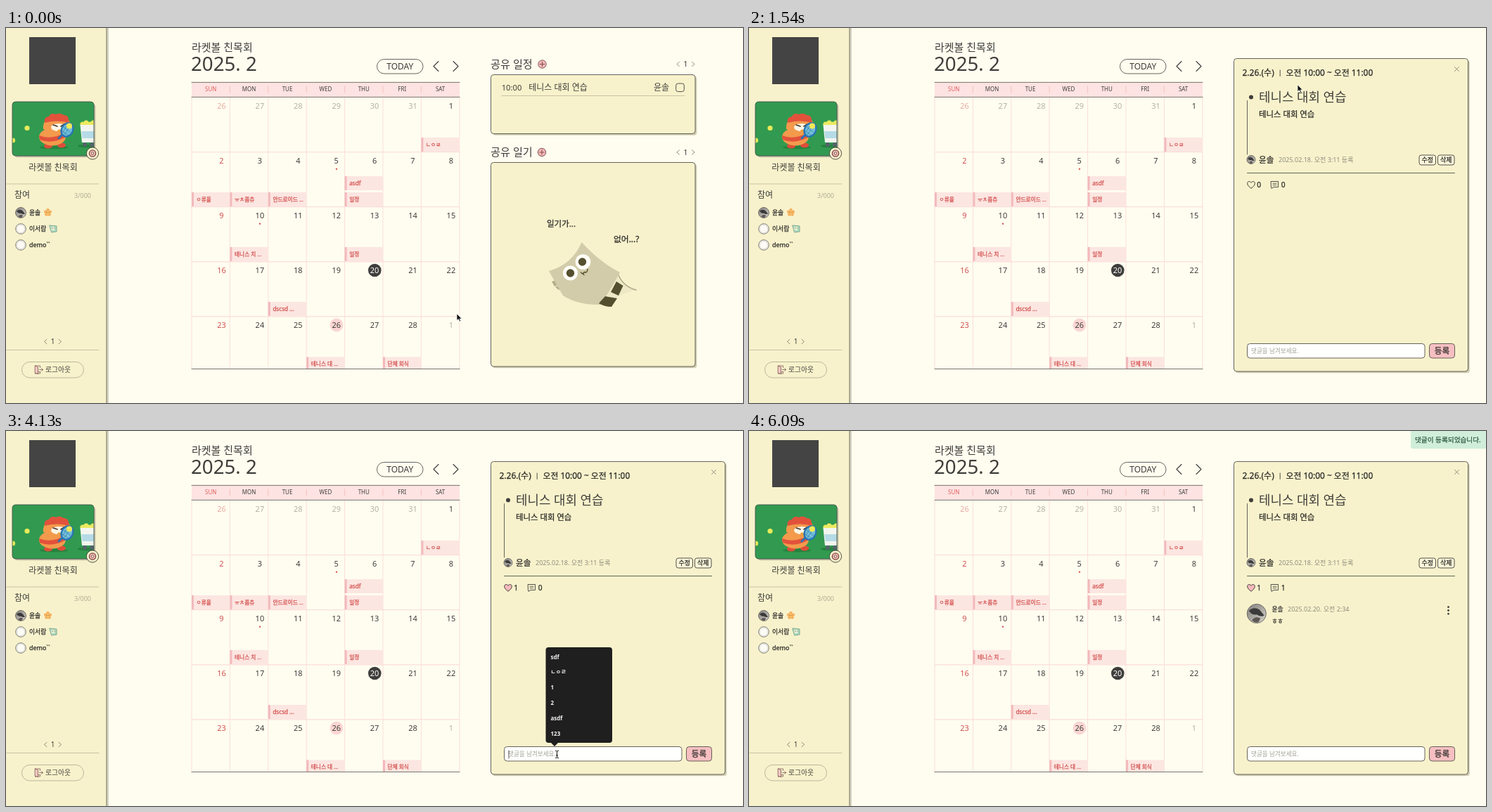
An HTML page that plays this animation: 1048 by 534 pixels, repeating every 7.28 s.

```html
<!DOCTYPE html>
<html lang="ko">
<head>
<meta charset="utf-8">
<style>
html, body { margin: 0; width: 100%; height: 100%; overflow: hidden; background: #fffdf0; }
svg { display: block; font-family: "Noto Sans", "Noto Sans CJK KR", sans-serif; }
</style>
</head>
<body>
<svg id="stage" width="1048" height="534" viewBox="0 0 1048 534"></svg>
<script>
const LOOP = 7280, STEP = 70;
const INK = '#3f3e3a', DARK = '#2b2a27', LINE = '#55534b', CREAM = '#f8f2cc', PAPER = '#fffdf0';
const RED = '#d3504f', GREY = '#8f8c7c', EDGE = '#c2bda1';
const CLUB = '라켓볼 친목회', USER = '윤솔', EVENT = '테니스 대회 연습';

// ---- drawing helpers ----
// o.m thickens the glyphs slightly, for a medium weight
const text = (x, cy, size, str, o = {}) => {
  const fill = o.fill || (o.m ? DARK : INK);
  const medium = o.m ? ` stroke="${fill}" stroke-width=".25"` : '';
  return `<text x="${x}" y="${(cy + size * 0.36).toFixed(2)}" font-size="${size}" fill="${fill}" font-weight="${o.w || 400}" text-anchor="${o.a || 'start'}"${medium}${o.id ? ` id="${o.id}"` : ''}>${str}</text>`;
};
const rect = (x, y, w, h, fill, r = 0, stroke = 'none', sw = 0.9) =>
  `<rect x="${x}" y="${y}" width="${w}" height="${h}" rx="${r}" fill="${fill}" stroke="${stroke}" stroke-width="${sw}"/>`;
const circle = (x, y, r, fill, stroke = 'none', sw = 0.9) =>
  `<circle cx="${x}" cy="${y}" r="${r}" fill="${fill}" stroke="${stroke}" stroke-width="${sw}"/>`;
const ellipse = (x, y, rx, ry, fill, rot = 0) =>
  `<ellipse cx="${x}" cy="${y}" rx="${rx}" ry="${ry}" fill="${fill}" transform="rotate(${rot} ${x} ${y})"/>`;
const path = (d, stroke = INK, sw = 0.9, fill = 'none') =>
  `<path d="${d}" fill="${fill}" stroke="${stroke}" stroke-width="${sw}" stroke-linejoin="round" stroke-linecap="round"/>`;
const shape = (d, fill) => path(d, 'none', 0, fill);
const group = (id, body) => `<g id="${id}">${body}</g>`;
const chevron = (x, y, w, h, dir, color = INK, sw = 1) =>
  path(`M${x - dir * w / 2} ${y - h / 2}L${x + dir * w / 2} ${y}L${x - dir * w / 2} ${y + h / 2}`, color, sw);
const card = (x, y, w, h) =>
  rect(x + 2.3, y + 2.3, w, h, '#cfcbb2', 4) + rect(x, y, w, h, CREAM, 4, LINE);
const plus = (x, y) =>
  circle(x, y, 5.7, '#f6b9b8', '#6b4a46', 0.9) + path(`M${x - 3.2} ${y}h6.4M${x} ${y - 3.2}v6.4`, '#7a3d3c', 0.9);
const photo = (x, y, r) =>
  circle(x, y, r, 'url(#photo)') +
  `<g transform="translate(${x} ${y}) scale(${r / 10})">` +
  shape('M-8 -3Q-3 -8 3 -4L8 2Q4 4 0 1Q-5 2 -8 -3Z', '#3b3a3b') +
  shape('M-5 7Q-1 2 4 5L2 9Q-2 10 -5 7Z', '#5d5754') + '</g>' +
  circle(x, y, r, 'none', '#5a5854', 0.8);
const pager = (x, y, gap, size) =>
  chevron(x - gap, y, 3.6, 6.4, -1, '#77735f', 0.8) + text(x, y, size, '1', { a: 'middle' }) +
  chevron(x + gap, y, 3.6, 6.4, 1, '#77735f', 0.8);

function clubArt() {
  return rect(11.3, 107.3, 116, 77, '#c3bfa5', 5) +
    `<clipPath id="clip">${rect(9, 105, 116, 77, '#fff', 4)}</clipPath><g clip-path="url(#clip)">` +
    rect(9, 105, 116, 77, '#319a50') +
    ellipse(68, 170, 20, 2.6, '#26823f') + ellipse(115, 168, 13, 2.4, '#26823f') +
    circle(30, 142.5, 3.6, '#e8ea5a') + circle(9.5, 160, 3.6, '#e8ea5a') +
    ellipse(60, 168, 6, 3.6, '#dd4e39') + ellipse(79, 167, 6, 3.4, '#dd4e39') +
    ellipse(66, 155, 19, 12.5, '#f39a4c') +
    shape('M47 153Q64 160 84 149L85 155Q66 166 48 159Z', '#e2523b') +
    shape('M53 144Q52 132 60 129H87Q93 134 91 144Q73 152 53 144Z', '#f39a4c') +
    shape('M55 135Q53 127 61 126Q64 120 71 123Q77 120 82 124Q89 124 89 131L90 135Q72 130 55 135Z', '#e2523b') +
    ellipse(75, 141.5, 11, 5.5, '#fdf4e4') +
    path('M67 138l6 2M83 137l-5 3', '#3b3130', 1.5) + ellipse(76, 146, 3, 1.6, '#f0a23c') +
    path('M75 157L81 151', '#2874b4', 3) +
    `<g transform="rotate(28 87 145)"><ellipse cx="87" cy="145" rx="8" ry="10" fill="#74bfd9" stroke="#2874b4" stroke-width="2.4"/></g>` +
    path('M82 141l10 8M80 147l9 6M92 139l-9 13M88 137l-7 11', '#317da9', 0.7) +
    circle(90, 139.5, 4, '#f0e957') +
    [109, 114, 119, 124].map((x, i) => circle(x, 137 - i % 2 * 2, 3.6, '#ecea60')).join('') +
    shape('M105.500 138H126V163H108Z', '#f3f5ee') + shape('M107.500 147H126V157H108.500Z', '#b5dbe6') +
    circle(112, 166, 3, '#55636a') + circle(122, 166, 3, '#55636a') +
    '</g>' + rect(9, 105, 116, 77, 'none', 5, '#45534a');
}

function sidebar() {
  const ring = y => circle(21, y, 7.3, '#fcfbf5', '#6e6c66', 0.9) + circle(21, y, 5.6, 'none', '#d4d2c9', 0.8);
  return rect(143, 0, 3, 534, '#d6d3c0') + rect(0, 0, 143, 534, CREAM) + rect(142.5, 0, 0.9, 534, '#66645a') +
    rect(33, 13, 66, 67, '#444444') + clubArt() +
    circle(123, 178.5, 8.6, CREAM, INK) + circle(123, 178.5, 4.6, '#f3bcb8', '#774644', 1.3) + circle(123, 178.5, 1.8, CREAM, '#774644', 0.9) +
    text(67, 199, 12, CLUB, { a: 'middle' }) +
    path('M1 222H132', EDGE) + text(12, 238, 12, '참여') + text(121, 238.5, 9, '3/000', { a: 'end', fill: '#b0ac96' }) +
    photo(21, 263, 7.5) + ring(286) + ring(309) +
    text(33, 263, 8.8, USER, { m: 1 }) + text(33, 286, 8.8, '이서람', { m: 1 }) + text(33, 309, 9, 'demo``', { m: 1 }) +
    [0, 1, 2, 3, 4].map(i => circle(59.5 + 3.4 * Math.sin(i * 1.257), 262.8 - 3.4 * Math.cos(i * 1.257), 2.3, '#f5b05c')).join('') +
    circle(59.5, 262.8, 3, '#f8bd68') + path('M58 262.5h.1M61 262.5h.1', '#80502a', 1) +
    path('M62 281L72 282L72 290L65 291Z', '#6f9b86', 0.8, '#a9d9be') + rect(64.5, 283, 5, 5, '#e6efd0', 1) + path('M66 285h.1M69 285h.1', INK, 1) +
    pager(66.5, 446.5, 10.3, 10) + path('M1 458.5H132', EDGE) +
    rect(22.5, 475.5, 88, 22.5, 'none', 11.2, '#b3af97', 0.9) +
    path('M41.500 481h7v2.500M48.500 489.500v2.500h-7z', '#7d5a55', 0.8) + path('M41.500 481l4 1.800v10l-4 -1.500z', '#7d5a55', 0.8, '#f6c6c3') +
    path('M47.500 486.500h5M50.700 484.700l1.900 1.800l-1.900 1.800', '#7d5a55', 0.8) +
    text(56, 486.8, 9.8, '로그아웃');
}

function calendar() {
  const X = 264, Y = 98.5, CW = 54.4, RH = 78.1, R = 645, B = 485.5;
  const days = ['SUN', 'MON', 'TUE', 'WED', 'THU', 'FRI', 'SAT'];
  const events = [
    [6, 156, 'ㄴㅇㄹ'], [0, 234, 'ㅇ류율'], [1, 234, 'ㅠㅊ퓸츄'], [2, 234, '안드로이드 ...'],
    [4, 211, 'asdf', 8.2], [4, 234, '일정'], [1, 312, '테니스 치 ...'], [4, 312, '일정'],
    [2, 390, 'dscsd ...', 8.1], [3, 468.5, '테니스 대 ...'], [5, 468.5, '단체 회식']];
  let s = text(X, 28, 15, CLUB, { w: 300 }) + text(X - 1, 51, 27.7, '2025. 2', { w: 300 }) +
    rect(527.5, 44.5, 65.5, 20.5, 'none', 10.2, LINE) + text(560.3, 54.6, 12, 'TODAY', { a: 'middle' }) +
    chevron(611.5, 54.5, 7, 14, -1, INK, 1.1) + chevron(639.5, 54.5, 7, 14, 1, INK, 1.1) +
    rect(X, 77, R - X, 21, '#fde3e2');
  for (let i = 0; i <= 7; i++) {
    const x = X + i * CW;
    s += path(`M${x} 99V485`, '#fbdedb', 1);
    if (i && i < 7) s += path(`M${x} 83V92`, '#f3c0bd', 0.9);
    if (i < 7) s += text(x + CW / 2, 87.2, 8, days[i], { a: 'middle', fill: i ? INK : '#e2605d' });
  }
  for (let r = 1; r < 5; r++) s += path(`M${X} ${Y + r * RH}H${R}`, '#fbdedb', 1.2);
  for (const [c, y, label, size = 7.7] of events) {
    const x = X + c * CW, h = Math.min(20, B - y);
    s += rect(x, y, CW, h, '#fce6e1') + rect(x, y, 3, h, '#f2babb') + text(x + 6.6, y + 9.8, size, label, { fill: RED, m: 1 });
  }
  s += path(`M${X} 77.4H${R}M${X} 98.4H${R}M${X} ${B}H${R}`, '#6a675e', 0.9);
  s += circle(524.3, 345, 9.3, '#3f3e3c') + circle(470, 423, 9.4, '#fbd6d3');
  for (let k = 0; k < 35; k++) {
    const c = k % 7, r = Math.floor(k / 7), n = k - 5;
    const day = n < 1 ? n + 31 : n > 28 ? n - 28 : n, out = n < 1 || n > 28;
    const fill = n === 20 ? '#fff' : c === 0 ? (out ? '#e9aaa2' : RED) : out ? '#b4b1a5' : INK;
    s += text(X + (c + 1) * CW - 11.9, 111 + r * 78, 11, day, { a: 'middle', fill });
  }
  return s + circle(470, 200.7, 1.2, '#df5a5a') + circle(361, 278.8, 1.2, '#df5a5a');
}

function mascot() {
  const dark = '#544f2e';
  return text(769, 279, 11.5, '일기가...', { m: 1 }) + text(864, 301, 11.8, '없어...?', { m: 1 }) +
    shape('M776 361l9 -3l4 6l-9 4zM781 369l8 -4l3 4l-6 4z', '#b5ae8d') +
    shape('M868 350Q875 369 897 373.5Q880 375 866 386L852 380Z', '#efe8c6') +
    path('M870 350Q877 368 896 373', '#aaa486', 1.4) +
    shape('M818.500 305Q845 334 873 348Q862 368 846 394Q814 395 792 381Q783 366 772 346Q806 336 818.500 305Z', '#d3ccaa') +
    shape('M868 361L877.500 367L871 381L860 376Z', dark) +
    shape('M852 382L869 385L861 397Q851 397 843 392Z', dark) +
    circle(820.5, 333, 10.8, '#fffef8') + circle(802.5, 349, 10.6, '#fffef8') +
    circle(819.5, 333, 5.7, dark) + circle(802.5, 349, 5.7, dark) +
    path('M817.500 348q2 3.500 5 -.5q4 2 4.500 -4M820 350l2 1.500', dark, 1.5);
}

function list() {
  return text(689, 52, 15.2, '공유 일정', { w: 300 }) + plus(762.5, 51.5) + pager(966.5, 51.5, 10.8, 11) +
    card(689.5, 66.5, 290.5, 84) +
    text(704.7, 84.8, 11.2, '10:00') + text(743.2, 84.8, 12, EVENT) + text(943, 84.8, 12, USER, { a: 'end' }) +
    rect(952.7, 79, 11.6, 11.6, 'none', 3, INK) + path('M705 96.500H965', EDGE) +
    text(689, 177, 15.2, '공유 일기', { w: 300 }) + plus(762, 177) + pager(966.5, 177, 10.8, 11) +
    card(689.5, 191.5, 290.5, 290.5) + mascot();
}

function detail() {
  const heart = 'M714 228.300C711 226 708.700 224 708.700 221.300C708.700 218 712.600 217.600 714 220.300C715.400 217.600 719.300 218 719.300 221.300C719.300 224 717 226 714 228.300Z';
  const small = (x, s) => rect(x + 0.5, 181, 23.5, 14, '#fbf6d9', 3, INK) + text(x + 12.2, 188, 8.9, s, { a: 'middle', m: 1 });
  return card(689.5, 43.5, 333, 445.5) +
    text(701.5, 64, 12, '2.26.(수)', { m: 1 }) + path('M755.200 60V68.500') + text(763.5, 64, 11.9, '오전 10:00 ~ 오전 11:00', { m: 1 }) +
    path('M1003.500 55.500l6 6m0 -6l-6 6', '#77756a', 0.8) +
    circle(714, 98.5, 3, INK) + path('M708.500 103.500V180', LINE) +
    text(725, 98.5, 17.9, EVENT, { w: 300 }) + text(725, 123.3, 11.4, EVENT, { m: 1 }) +
    photo(714, 187.5, 6) + text(725, 187.5, 11.6, USER, { m: 1 }) + text(753, 188, 9, '2025.02.18. 오전 3:11 등록', { fill: GREY }) +
    small(952.5, '수정') + small(979, '삭제') + path('M708.500 206.500H1003.500', LINE) +
    `<path id="heart" d="${heart}" stroke="${INK}" stroke-width="1"/>` + text(722.3, 223, 10.2, '0', { id: 'likes', m: 1 }) +
    path('M742.500 218.500H752.500V226.500H746L743 228.500L742.500 226.500Z') + path('M745 221.300H750M745 223.700H750', INK, 0.8) +
    text(756.8, 223, 10.2, '0', { id: 'replies', m: 1 }) +
    group('reply', photo(721.8, 260, 13.6) + text(743.5, 254, 8.8, USER, { w: 700 }) +
      text(766, 254, 9, '2025.02.20. 오전 2:34', { fill: GREY }) + text(743.5, 271.3, 8.7, 'ㅎㅎ', { m: 1 }) +
      [250.7, 255.5, 260.3].map(y => circle(994.5, y, 1.4, INK)).join('')) +
    rect(708.5, 449.5, 252.5, 20.5, '#fffffd', 4, LINE) + text(714, 460.2, 8.6, '댓글을 남겨보세요.', { fill: '#a3a19a', id: 'hint' }) +
    text(714, 460, 8.4, '', { id: 'typed', m: 1 }) + path('M715 455V466').replace('<path', '<path id="caret"') +
    `<rect id="send" x="967.5" y="449.500" width="36" height="20.500" rx="4" stroke="${LINE}" stroke-width=".9"/>` +
    text(985.5, 460, 11.6, '등록', { a: 'middle', m: 1 }) +
    group('history', shape('M774 443L780 449L786 443Z', '#1f1f1f') + rect(767.5, 308, 94.5, 136, '#1f1f1f', 4) +
      ['sdf', 'ㄴㅇㄹ', '1', '2', 'asdf', '123'].map((s, i) => text(774.5, 321.8 + i * 21.8, 8, s, { fill: '#f4f4f4', w: 600 })).join(''));
}

const toast = rect(941, -4, 111, 29.3, '#d0eeda', 3) + text(947, 12.8, 9.65, '댓글이 등록되었습니다.', { fill: '#2f5b43', m: 1 });
const cursors =
  group('arrow', path('M0 0V9.500L2.300 7.500L4 11L5.600 10.300L4.100 7H7Z', '#fff', 0.7, '#111')) +
  group('hand', path('M-.8 .5Q0 -.8 1 .5L1.800 4L2.500 3.600Q3.500 3 4 4Q5 3.400 5.600 4.500Q6.900 4.300 7 5.600Q7.400 8.500 6 11H.6Q-1 8.500 -3 6.700Q-3 5 -1.300 5.700L0 6.700Z', '#222', 0.9, '#fff') + path('M2.300 7v2.200M4.200 7v2.200', '#222', 0.6)) +
  group('beam', path('M-2 -5.300Q0 -5.300 0 -4V4Q0 5.300 -2 5.300M2 -5.300Q0 -5.300 0 -4M0 4Q0 5.300 2 5.300M-1 1.500H1', '#111', 1));

const stage = document.getElementById('stage');
stage.innerHTML = `<defs><linearGradient id="photo" x2="1" y2="1"><stop stop-color="#858381"/><stop offset=".5" stop-color="#aaa7a2"/><stop offset="1" stop-color="#d8d5cd"/></linearGradient></defs>` +
  rect(0, 0, 1048, 534, PAPER) + sidebar() + calendar() + group('list', list()) + group('detail', detail()) +
  group('toast', toast) + group('cursor', cursors);

// ---- motion ----
const $ = id => document.getElementById(id);
const show = (id, on) => $(id).setAttribute('display', on ? 'inline' : 'none');
const ease = p => p * p * (3 - 2 * p);
const track = [
  [0, 641, 407], [770, 781, 95], [980, 780, 81], [1750, 780, 81], [2520, 715, 220], [2940, 715, 220],
  [3150, 715, 224], [3360, 715, 224], [3780, 815, 457], [3990, 783.5, 460.5], [4410, 783.5, 460.5],
  [4830, 962, 460], [5180, 977, 463], [5530, 977, 463], [6090, 1056, 508]];

function pointer(t) {
  let i = 0;
  while (i < track.length - 2 && t > track[i + 1][0]) i++;
  const [t0, x0, y0] = track[i], [t1, x1, y1] = track[i + 1];
  const p = ease(Math.min(1, Math.max(0, (t - t0) / (t1 - t0))));
  return [x0 + (x1 - x0) * p, y0 + (y1 - y0) * p];
}

function render(now) {
  const t = Math.floor(now % LOOP / STEP) * STEP;
  const open = t >= 1540, liked = t >= 3360, sent = t >= 5530;
  const typed = t >= 4550 && !sent ? (t >= 4900 ? 'ㅎㅎ' : 'ㅎ') : '';
  const focus = t >= 4130 && t < 4550;
  const [x, y] = pointer(t);
  const inside = (l, top, r, b) => x >= l && x <= r && y >= top && y <= b;
  const onSend = open && inside(967, 449, 1004, 470);
  const onLink = open ? onSend || inside(708, 217, 729, 229) : inside(705, 75, 965, 97);
  const onInput = open && inside(708, 449, 961, 470);

  show('list', !open);
  show('detail', open);
  $('heart').setAttribute('fill', liked ? '#f6b9bc' : 'none');
  $('likes').textContent = liked ? '1' : '0';
  $('replies').textContent = sent ? '1' : '0';
  show('reply', sent);
  show('hint', !typed);
  $('typed').textContent = typed;
  show('caret', focus);
  show('history', focus);
  $('send').setAttribute('fill', onSend ? '#f39b9b' : '#f6bfc1');

  const slide = ease(Math.min(1, Math.max(0, (t - 5530) / 350)));
  show('toast', sent);
  $('toast').setAttribute('transform', `translate(${(1 - slide) * 108} 0)`);

  show('cursor', t < 6090);
  $('cursor').setAttribute('transform', `translate(${x.toFixed(2)} ${y.toFixed(2)})`);
  show('arrow', !onLink && !onInput);
  show('hand', onLink);
  show('beam', onInput && !onLink);
}

const start = performance.now();
function tick() {
  render(performance.now() - start);
  requestAnimationFrame(tick);
}
tick();
</script>
</body>
</html>
```
